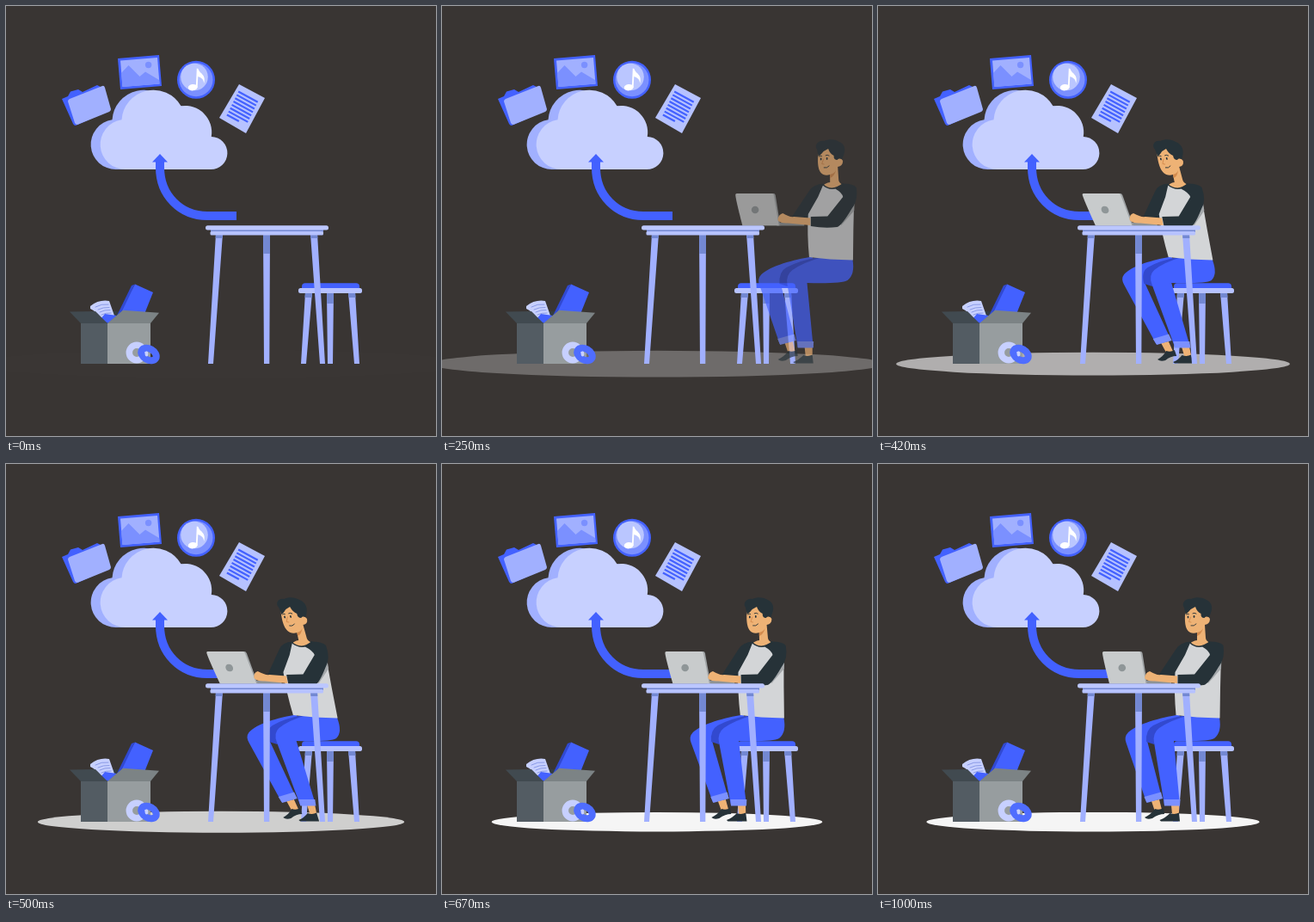
These frames come from a looping animation (500x500 px, 1040 ms). An HTML page:

```html
<!DOCTYPE html>
<html lang="en">
<head>
<meta charset="utf-8">
<title>Working from the cloud</title>
<style>
html, body { margin: 0; width: 100%; height: 100%; overflow: hidden; background: #393533; }
svg { display: block; width: 100vw; height: 100vh; }
.b { fill: #4361ff; }
.mid { fill: #7b90ff; }
.soft { fill: #a1b0ff; }
.pale { fill: #c7d0ff; }
.plank { fill: #b6c2ff; }
.shade { fill: #7388d2; }
.dark { fill: #263238; }
.skin { fill: #eeb275; }
.shirt { fill: #d3d5d7; }
.line { fill: none; stroke-linecap: round; }
</style>
</head>
<body>
<svg viewBox="0 0 500 500">
  <defs>
    <path id="puff" d="M139 190A29 29 0 0 1 134.500 132.300A37 37 0 0 1 203.500 116.300A31 31 0 0 1 238.800 152A19 19 0 0 1 238 190Z"/>
  </defs>

  <ellipse id="floor" cx="250" cy="416.200" rx="193.700" ry="11.300" fill="#f5f5f5"/>

  <!-- folder -->
  <path class="b" d="M65 108L72 105L75 99.500L84 97L89 100L106 92L110 94L120 122L81 139Q79 139 78 137Z"/>
  <path class="soft" d="M74 108L112 93Q114 92 115 95L122 120Q122 122 120 123L83 138Q81 138 80 136L72 111Q72 109 74 108Z"/>

  <!-- picture -->
  <path class="b" d="M130 61L178 57L181 93L133 97Z"/>
  <path class="soft" d="M133 63.500L176 60L178.500 90.500L135.500 94Z"/>
  <path class="mid" d="M134 78L142.500 69L155.500 82L162 76.500L178 86L178.500 90.500L135.500 94Z"/>
  <circle class="mid" cx="165.600" cy="68.500" r="3.700"/>

  <!-- music -->
  <circle class="b" cx="221" cy="85.800" r="22"/>
  <circle class="mid" cx="221" cy="85.800" r="19.500"/>
  <circle cx="219" cy="82.500" r="15.800" fill="#bac6ff"/>
  <ellipse cx="217.200" cy="94.700" rx="5.400" ry="3.700" fill="#fff" transform="rotate(-8 217 95)"/>
  <path fill="#fff" d="M220.800 95L221.800 72.500L223.500 73C225 79 233 79 230.300 90C229.500 84 226 83 223.300 82L222.600 95Z"/>

  <!-- document -->
  <path class="plank" d="M271 91L301 107L279 148L248 130Z"/>
  <g id="lines" class="line" stroke="#4361ff" stroke-width="2.200" style="stroke-linecap:butt"></g>

  <use href="#puff" class="soft" x="-11"/>
  <use href="#puff" class="pale"/>
  <path class="line" style="stroke-linecap:butt" stroke="#4361ff" stroke-width="10" d="M179 179V188C179 220 203 244 234 244H268"/>
  <path class="b" d="M170 181.500L179 172L188 181.500Z"/>

  <!-- box -->
  <path fill="#343c41" d="M104 355H136L118 369Z"/>
  <path class="pale" d="M98 349Q108 341 120 343L126 360L112 366Q107 356 98 352Z"/>
  <path class="line" stroke="#8b9be6" stroke-width="1" d="M104 350Q111 346 119 347M107 353Q113 350 120 350.500M109 356Q115 353 121 353.500M111 359Q116 356.500 122 357"/>
  <path class="b" d="M150 323.500L171 333L161 358L130 360Z"/>
  <path fill="#3049d2" d="M150 323.500L146 325L129 360L132 361Z"/>
  <path class="b" d="M109 365L115 358L129 360L119 369Z"/>
  <path fill="#414a50" d="M74 355.500L104 355L118 369H87Z"/>
  <path fill="#7c8385" d="M118 369L136 353.800L178 356.800L168 369Z"/>
  <path fill="#535c63" d="M87 369H118V416H87Z"/>
  <path fill="#979d9f" d="M118 369H168V416H118Z"/>
  <circle cx="152" cy="403" r="8.700" class="line" stroke="#c7d0ff" stroke-width="7.500"/>
  <ellipse cx="166" cy="405" rx="9.400" ry="6.400" class="line" stroke="#4f6dff" stroke-width="8" transform="rotate(30 166 405)"/>
  <ellipse cx="163.500" cy="404.500" rx="1.900" ry="3" class="pale"/>

  <!-- stool -->
  <path class="soft" d="M348 333H356L349 416H343ZM373 333H381L380 416H374ZM398 333H406L411 416H405Z"/>
  <path class="shade" d="M348 333H356L355.500 339H347.500ZM373 333H381V346H373ZM398 333H406L406.500 339H398.500Z"/>
  <rect class="b" x="344" y="322.300" width="67" height="9" rx="4"/>
  <rect class="plank" x="340" y="328" width="74" height="6" rx="2.500"/>

  <g id="person">
    <!-- legs -->
    <path class="skin" d="M318 392L327 390L330 402L322 404ZM341 397H350V407H342Z"/>
    <path class="dark" d="M310 411Q318 407 322 401Q327 403 332 400L333 407Q326 407 319 412Q313 414 310 411ZM327.500 414Q335 411 339.500 406Q345 408 350 405.500L351 415.500H329Z"/>
    <path class="b" d="M350 291.500C328 295 302 302 291 312Q286 317 288.500 324L312 393L330 388L313 322L360 310Z"/>
    <path fill="#3249cf" d="M312 323Q311 309 320 304Q335 296 357 292L366 300L330 310L321 326Z"/>
    <path class="b" d="M397 295Q400 312 391 319Q384 323 344 322L351 397H333L321 324Q319 313 327 307Q340 298 362 292Z"/>
    <path class="mid" d="M309.500 387L329 381.500L331 389L312.500 394ZM332.500 390H351.500L351 397.500H333Z"/>

    <!-- laptop -->
    <path fill="#8e9395" d="M309 252H341V255.500H309Z"/>
    <path fill="#9fa3a5" d="M263 218H305.500Q307 218 307.500 220L313 255.300H270Z"/>
    <path fill="#c8cbcc" d="M262.500 218H303.500Q305 218 305.500 220L311.500 255.300H269Q261 224 261 219.500Q261 218 262.500 218Z"/>
    <circle cx="283.800" cy="237" r="4.300" fill="#8f9698"/>

    <!-- far arm and torso -->
    <path class="dark" d="M364 206.500Q351 207 346 216L326 246L347 249L363 225Z"/>
    <path class="shirt" d="M363 208Q373 216 386 207L399 221L398 260L397.500 295.500Q370 295 346.500 292Q344 265 345.500 242L357 222Z"/>
    <path fill="#a3a7aa" d="M399.500 224L399 238L384 255L380 250Z"/>
    <path class="skin" d="M310 249Q311 242 316 241Q324 246 329 245L348 246.500V255L322 252.500Q313 253 310 249Z"/>
    <path class="dark" d="M384 206.500Q398 206 401.500 211Q404 226 396 236Q384 256 379 257Q365 259 348.500 256V245L368 244.500L386 222Q385 217 377 212.500Z"/>

    <!-- head -->
    <path class="skin" d="M358 166C356 180 356 195 365 196.500Q368 197 371 196L371 205Q365 206 363.500 208.500Q373 216 385 207.500Q381 205 381 202L380 187Q386 186 386 180Q384 176 379 178L376 166Z"/>
    <path fill="#d48b4e" d="M371 196Q376 195 378 191Q376 198 371 200Z"/>
    <path class="line" stroke="#263238" stroke-width="1.600" d="M363 208Q373 217 386 207"/>
    <path class="dark" d="M356 167C352 162 358 155.500 364 157C370 154 378 155 382 158C389 161 389 168 387 173L385 178Q381 176 379.500 179Q375 179 375.500 174Q371 172 369 166Q364 168 361 172Q359 174 357.500 175Z"/>
    <ellipse class="dark" cx="360.500" cy="178" rx=".9" ry="1.400"/>
    <ellipse class="dark" cx="367.500" cy="177.500" rx=".9" ry="1.400"/>
    <path class="line" stroke="#263238" stroke-width=".9" d="M358.500 175Q360 173.500 361.500 174.500M366 173.700Q368 172.500 370 174M364 188Q367.500 189 370 186"/>
    <path class="line" stroke="#d48b4e" stroke-width=".9" d="M363.500 178L361.500 183.500L364 184"/>
  </g>

  <!-- table -->
  <path class="soft" d="M244 265H252L241 416H235ZM299 265H307L306.300 416H300ZM354 265H362L371 416H365Z"/>
  <path class="shade" d="M244 265H252L251.500 270H243.600ZM299 265H307V288H299.200ZM354 265H362L362.400 270H354.400Z"/>
  <rect class="shade" x="238" y="259" width="131" height="4"/>
  <rect class="plank" x="237.500" y="262" width="131.500" height="4.600" rx="1.500"/>
  <rect fill="#bcc7ff" x="232" y="255.200" width="143" height="5.300" rx="2.500"/>
</svg>
<script>
const $ = id => document.getElementById(id);
const person = $('person'), floor = $('floor');
const LOOP = 1040, STEPS = 24, LEAD = 0.03;
const SLANT = { in: -20, over: 10, back: -2, rest: 0 };

$('lines').innerHTML = Array.from({ length: 8 }, (_, i) => {
  const x = 270.2 - 1.9 * i, y = 99.5 + 3.85 * i, k = i < 7 ? 1 : 0.62;
  return `<path d="M${x} ${y}l${22.5 * k} ${12.3 * k}"/>`;
}).join('');

const curve = (a, b, s) => 3 * (1 - s) ** 2 * s * a + 3 * (1 - s) * s * s * b + s ** 3;

// cubic-bezier(.36, -.01, .5, 1.38), solved by bisection
function ease(x) {
  if (x <= 0) return 0;
  if (x >= 1) return 1;
  let lo = 0, hi = 1;
  for (let i = 0; i < 24; i++) {
    const s = (lo + hi) / 2;
    if (curve(0.36, 0.5, s) < x) lo = s; else hi = s;
  }
  return curve(-0.01, 1.38, lo);
}

const clamp = v => Math.max(0, Math.min(1, v));
const slope = deg => Math.tan(deg * Math.PI / 180);
const mix = (a, b, p) => a + (b - a) * p;

function progress(ms) {
  const start = n => Math.round(n * 100 / STEPS) * 10;
  let n = STEPS;
  while (start(n) > ms) n--;
  return Math.min(1, n / STEPS + LEAD);
}

function pose(x) {
  if (x < 0.6) {
    const p = ease(x / 0.6);
    return { dx: 250 * (1 - p), skew: mix(slope(SLANT.in), slope(SLANT.over), p), alpha: clamp(p) };
  }
  const skew = x < 0.8
    ? mix(slope(SLANT.over), slope(SLANT.back), ease((x - 0.6) / 0.2))
    : mix(slope(SLANT.back), slope(SLANT.rest), ease((x - 0.8) / 0.2));
  return { dx: 0, skew, alpha: 1 };
}

function draw(ms) {
  const x = progress(ms), p = ease(x), { dx, skew, alpha } = pose(x);
  person.setAttribute('transform', `matrix(1 0 ${skew} 1 ${dx - skew * 281} 0)`);
  person.setAttribute('opacity', alpha);
  const scale = 1.5 - 0.5 * p;
  floor.setAttribute('rx', 193.7 * scale);
  floor.setAttribute('ry', 11.3 * scale);
  floor.setAttribute('opacity', clamp(p));
}

const begin = performance.now();
function tick() {
  draw((performance.now() - begin) % LOOP);
  requestAnimationFrame(tick);
}
tick();
</script>
</body>
</html>
```
